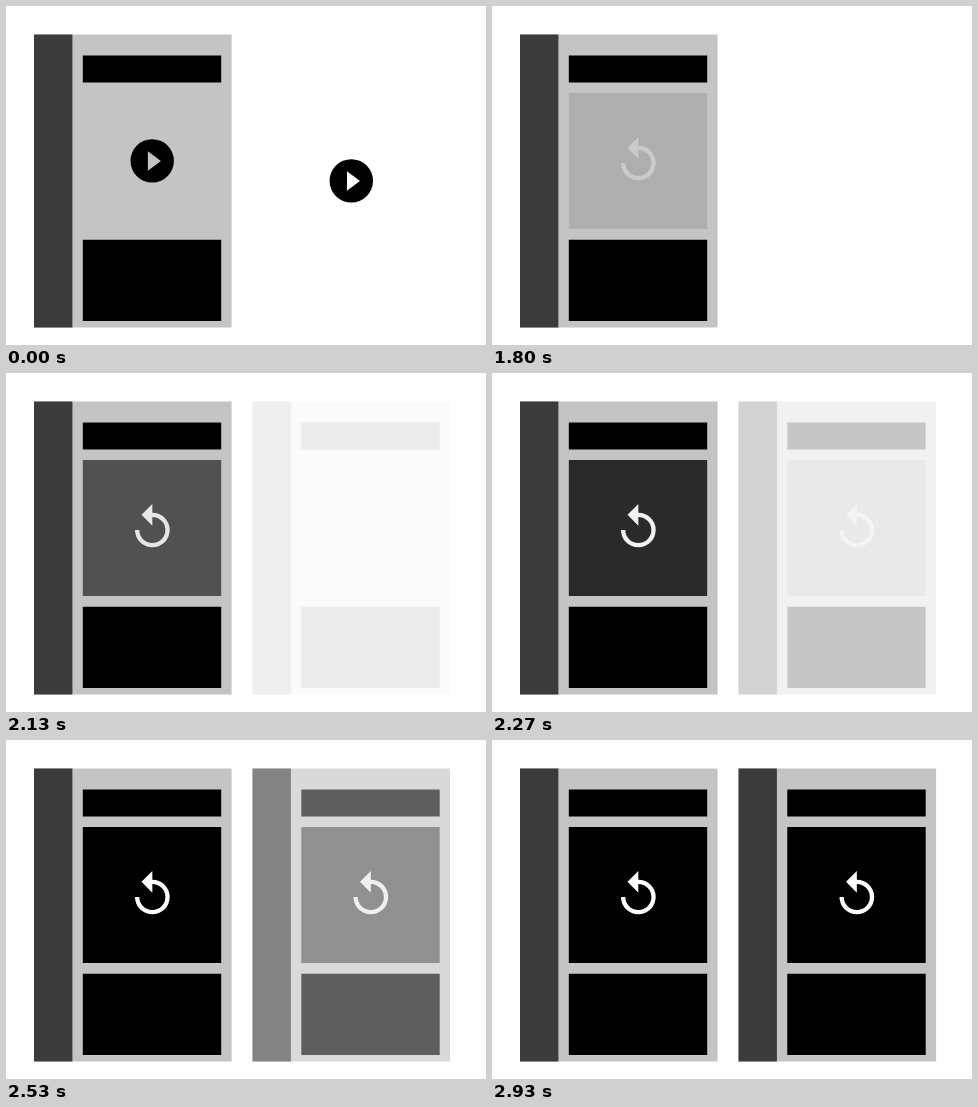
These frames come from a looping animation (480 px wide and 339 px high, 3340 ms). An HTML page:

```html
<!DOCTYPE html>
<html lang="en">
<head>
<meta charset="utf-8">
<title>Staggered card loading</title>
<style>
html, body { margin: 0; height: 100%; overflow: hidden; background: #fff; }
svg { display: block; width: 480px; height: 339px; }
</style>
</head>
<body>
<svg viewBox="0 0 480 339">
  <defs>
    <g id="base">
      <path fill="#c4c4c4" d="M28 28.5h197.6v292.9H28z"/>
      <path fill="#3b3b3b" d="M28 28.5h38.4v292.9H28z"/>
      <path d="M76.8 49.6h138.4v27H76.8zM76.8 233.7h138.4v81.2H76.8z"/>
    </g>
    <g id="media">
      <path d="M76.8 87h138.4v136H76.8z"/>
      <path fill="#fff" transform="translate(120.3 128.8) scale(2.17)"
        d="M12 5V1L7 6l5 5V7a6 6 0 1 1-6 6H4a8 8 0 1 0 8-8z"/>
    </g>
    <path id="play" fill-rule="evenodd" transform="scale(2.17)"
      d="M-10 0a10 10 0 1 1 20 0a10 10 0 1 1-20 0zM-2-4.5v9L4 0z"/>
  </defs>
  <use href="#base"/>
  <use href="#media" id="media1"/>
  <use href="#play" id="play1" x="0" transform="translate(146.2 154.9)"/>
  <g id="card2" transform="translate(218.5 0)">
    <use href="#base"/>
    <use href="#media" id="media2"/>
  </g>
  <use href="#play" id="play2" transform="translate(345.3 174.9)"/>
</svg>
<script>
const LOOP = 3340, STEP = 1000 / 15, FADE = 980;
const $ = id => document.getElementById(id);
const show = (id, opacity) => $(id).setAttribute('opacity', opacity);

// Cosine ease in and out
function fade(t, start) {
  const p = Math.min(1, Math.max(0, (t - start) / FADE));
  return 0.5 - Math.cos(Math.PI * p) / 2;
}

function draw(now) {
  const time = now % LOOP;
  // The animation advances at 15 steps per second
  const t = Math.floor((time + 4) / STEP) * STEP;
  show('play1', time < 130 ? 1 : 0);
  show('play2', time < 530 ? 1 : 0);
  show('media1', fade(t, 1592));
  show('card2', fade(t, 1962));
  show('media2', fade(t, 1987));
}

let begin;
function tick(now) {
  begin ??= now;
  draw(now - begin);
  requestAnimationFrame(tick);
}
draw(0);
requestAnimationFrame(tick);
</script>
</body>
</html>
```
